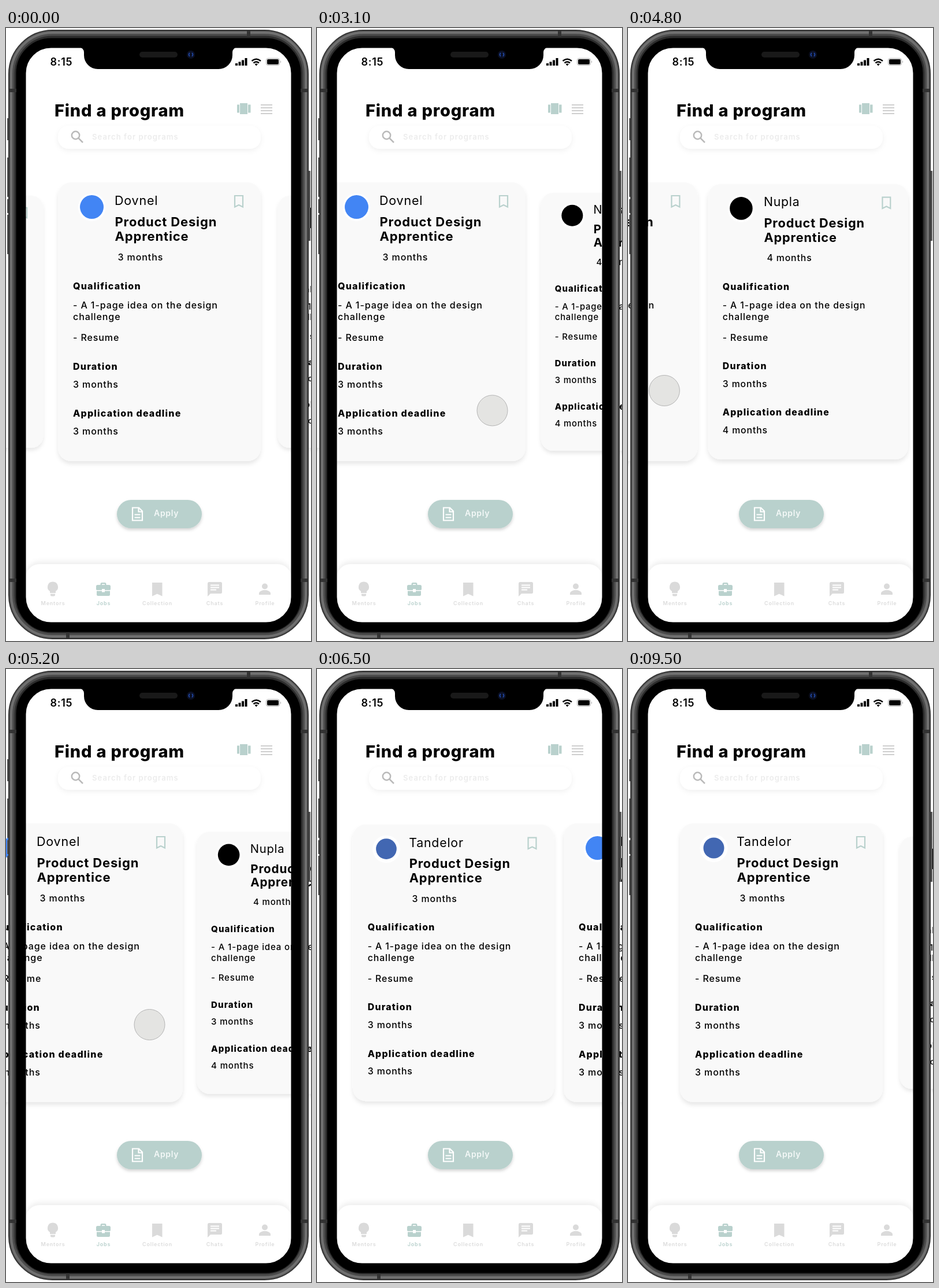
Recreate the animation shown at these times as an HTML page. Size 528x1060 px, loop 9.6 s.

```html
<!DOCTYPE html>
<html lang="en">
<head>
<meta charset="utf-8">
<title>Find a program</title>
<style>
  html, body { margin: 0; width: 100%; height: 100%; overflow: hidden; background: #fff; }
  svg { display: block; width: 528px; height: 1060px; }
  text { font-family: Inter, "Liberation Sans", sans-serif; font-optical-sizing: none; white-space: pre; }
  .body { font-size: 16px; font-weight: 500; letter-spacing: .9px; }
  .head { font-size: 16px; font-weight: 800; letter-spacing: 1.2px; }
  .role { font-size: 22px; font-weight: 700; letter-spacing: .85px; }
  .firm { font-size: 21.5px; letter-spacing: .8px; }
  .title { font-size: 29px; font-weight: 800; letter-spacing: .8px; }
  .clock { font-size: 18px; font-weight: 600; letter-spacing: .7px; }
  .hint { font-size: 13px; font-weight: 600; letter-spacing: 1.1px; fill: #ececec; }
  .apply { font-size: 14px; font-weight: 600; letter-spacing: .7px; fill: #f3f8f7; }
  .tab { font-size: 9px; font-weight: 600; letter-spacing: .8px; text-anchor: middle; }
</style>
</head>
<body>
<svg viewBox="0 0 528 1060">
  <defs>
    <filter id="soft" x="-10%" y="-10%" width="120%" height="125%">
      <feDropShadow dx="0" dy="5" stdDeviation="3.500" flood-opacity=".09"/>
    </filter>
    <filter id="faint" x="-10%" y="-20%" width="120%" height="160%">
      <feDropShadow dx="0" dy="3" stdDeviation="4" flood-opacity=".06"/>
    </filter>
    <filter id="lift" x="-10%" y="-20%" width="120%" height="160%">
      <feDropShadow dx="0" dy="3" stdDeviation="2.500" flood-opacity=".17"/>
    </filter>
    <clipPath id="screen"><rect x="34" y="34" width="460" height="994" rx="44"/></clipPath>
  </defs>

  <g id="cards"></g>

  <text class="title" x="84" y="153">Find a program</text>
  <path d="M405 130h13v19h-13zM400 132.500h4v14h-4zM419 132.500h4.500v14h-4.500z" fill="#b9d1cd"/>
  <path d="M441 133h20m-20 5h20m-20 5h20m-20 5h20" stroke="#cfcfcf" stroke-width="2"/>

  <rect x="90" y="169" width="351" height="40" rx="19" fill="#fff" filter="url(#faint)"/>
  <g fill="none" stroke="#bababa" stroke-width="2.500">
    <circle cx="120.500" cy="185.500" r="6.700"/><path d="M125.500 190.500l7.500 7.500"/>
  </g>
  <text class="hint" x="149" y="193">Search for programs</text>

  <rect x="192" y="816" width="147" height="49" rx="24.500" fill="#b9d1cd" filter="url(#lift)"/>
  <path d="M219 829.500h11l6 6v16h-17zM229.500 830v6.500h6M222.500 841.500h10m-10 5h10" fill="none" stroke="#fff" stroke-width="2.200"/>
  <text class="apply" x="256" y="844">Apply</text>

  <g clip-path="url(#screen)">
    <rect x="34" y="927" width="460" height="130" rx="24" fill="#fff" style="filter:drop-shadow(0 -4px 4px #00000012)"/>
  </g>
  <g fill="#dadada">
    <path d="M81 957.500a9 9 0 0 0-5 16.500v3h10v-3a9 9 0 0 0-5-16.500zM77 978.500h8v2q0 2-2 2h-4q-2 0-2-2z"/>
    <path d="M253 959h17.500v23.500l-8.750-4-8.750 4z"/>
    <path d="M351 958h20.500q2.500 0 2.500 2.500v15q0 2.500-2.500 2.500h-17.500l-5 5v-22.500q0-2.500 2-2.500z"/>
    <path d="M354 963.500h15m-15 4h15m-15 4h10" stroke="#fff" stroke-width="2"/>
    <circle cx="448" cy="965.500" r="5"/>
    <path d="M438 980v-2.500c0-3.500 6-5.500 10-5.500s10 2 10 5.500v2.500z"/>
  </g>
  <g fill="#b9d1cd">
    <path d="M163.500 963v-1.500q0-2.500 2.500-2.500h5q2.500 0 2.500 2.500v1.500h5q2.500 0 2.500 2.500v5q0 1.500-2 1.500h-8v-2h-5v2h-8q-2 0-2-1.500v-5q0-2.500 2.500-2.500zm2.500 0h5v-1.500h-5z"/>
    <path d="M157 973.500h9v2h5v-2h9v6q0 2.500-2.500 2.500h-18q-2.500 0-2.500-2.500z"/>
  </g>
  <g id="tabs"></g>

  <text class="clock" x="76.500" y="65">8:15</text>
  <path d="M397 61h4v4h-4zM402.500 58.500h4v6.500h-4zM408 55.500h4v9.500h-4zM413.500 52h4v13h-4z"/>
  <path d="M425.500 57q7.750-6.500 15.500 0M428.500 60.500q4.750-4 9.500 0" fill="none" stroke="#000" stroke-width="2.500"/>
  <path d="M433.250 65.500l-2.600-3q2.600-2 5.200 0z"/>
  <rect x="450.500" y="52.500" width="23" height="12" rx="3.500" fill="none" stroke="#aaa"/>
  <rect x="452" y="54" width="20" height="9" rx="2"/>
  <path d="M475 56.500q2 2 0 4z" fill="#aaa"/>

  <g fill="none">
    <path d="M3.500 156v38M3.500 224v68M3.500 296v24M3.500 323v68M525.500 247v121" stroke="#555" stroke-width="3"/>
    <rect x="11.500" y="10.500" width="505" height="1039" rx="69" stroke="#2c2c2c" stroke-width="15"/>
    <rect x="10" y="9" width="508" height="1042" rx="70" stroke="#4c4c4c" stroke-width="9"/>
    <rect x="9" y="8" width="510" height="1044" rx="71" stroke="#707070" stroke-width="4"/>
    <rect x="26" y="26" width="476" height="1010" rx="52" stroke="#000" stroke-width="17"/>
    <path d="M4 108h14M510 108h14M4 955h14M510 955h14M420 3v12M107 1045v12" stroke="#333" stroke-width="6"/>
  </g>
  <path d="M126 33a9 9 0 0 1 9 9v5a24 24 0 0 0 24 24h209a24 24 0 0 0 24-24v-5a9 9 0 0 1 9-9z"/>
  <rect x="231" y="41" width="66" height="10" rx="5" fill="#191919"/>
  <circle cx="320" cy="46" r="7" fill="#0b1024"/>
  <path d="M318 43q-3 3 0 6M322 43q3 3 0 6" fill="none" stroke="#2450b8" stroke-width="1.500"/>

  <circle id="cursor" r="26.500"/>
</svg>
<script>
const LOOP = 9600, TRAVEL = 367, SMALL = .905, CX = 265.5, CY = 508;
const $ = id => document.getElementById(id);
const label = (cls, x, y, s) => `<text class="${cls}" x="${x}" y="${y}">${s}</text>`;

const card = (id, firm, color, radius, months) => `<g id="${id}">
  <rect x="90" y="267" width="351" height="482" rx="23" fill="#f9f9f9" filter="url(#soft)"/>
  <circle cx="148.500" cy="310" r="24" fill="#fff"/>
  <circle cx="148.500" cy="309.500" r="${radius}" fill="${color}"/>
  <path d="M396 290h14v19.500l-7-3.500-7 3.500z" fill="none" stroke="#b9d1cd" stroke-width="2.200"/>` +
  label("firm", 188, 306, firm) +
  label("role", 188.5, 343, "Product Design") +
  label("role", 188.5, 368, "Apprentice") +
  label("body", 193.5, 402, months) +
  label("head", 116, 452, "Qualification") +
  label("body", 116, 485, "- A 1-page idea on the design") +
  label("body", 116, 505, "challenge") +
  label("body", 116, 541, "- Resume") +
  label("head", 116, 591, "Duration") +
  label("body", 116, 622, "3 months") +
  label("head", 116, 672, "Application deadline") +
  label("body", 116, 703, months) + "</g>";

$("cards").innerHTML =
  card("left", "Tandelor", "#4267b2", 18, "3 months") +
  card("right", "Nupla", "#000", 20, "4 months") +
  card("middle", "Dovnel", "#4285f4", 20.5, "3 months");

$("tabs").innerHTML = [["Mentors", 81.5], ["Jobs", 169], ["Collection", 262], ["Chats", 361.5], ["Profile", 448.5]]
  .map(([s, x]) => `<text class="tab" x="${x}" y="998" fill="${s === "Jobs" ? "#b9d1cd" : "#dcdcdc"}">${s}</text>`).join("");

// Keys are [time, value, ...]; between them values run linearly.
const drag = [[2900, 0], [3600, -280], [4000, -TRAVEL], [4700, -TRAVEL], [5200, -135], [6000, 33], [6200, 130], [6500, 337], [6700, TRAVEL]];
const hover = [[100, 560, 130], [1000, 510, 225], [1500, 467, 350], [1700, 447, 475], [2300, 447, 475], [2800, 384, 666]];
const height = [[2900, 666], [3600, 650], [4000, 636], [4700, 630], [5200, 615], [6000, 628], [6200, 632]];

function at(keys, t, i = 1) {
  const n = keys.findIndex(k => k[0] > t);
  if (n === 0) return keys[0][i];
  if (n < 0) return keys[keys.length - 1][i];
  const a = keys[n - 1], b = keys[n];
  return a[i] + (b[i] - a[i]) * (t - a[0]) / (b[0] - a[0]);
}

// A side card grows to full size as it reaches the centre.
function placeSide(id, home, p) {
  const s = SMALL + (1 - SMALL) * p, x = CX + home * (1 - p);
  $(id).setAttribute("transform", `translate(${x} ${CY}) scale(${s}) translate(${-CX} ${-CY})`);
}

function draw(now) {
  const t = Math.floor(now % LOOP / 100) * 100;
  const shift = at(drag, t), pressed = t >= 2900;
  placeSide("left", -360, Math.max(0, shift) / TRAVEL);
  placeSide("right", 364, Math.max(0, -shift) / TRAVEL);
  $("middle").setAttribute("transform", `translate(${shift} 0)`);
  $("middle").setAttribute("visibility", t < 6800 ? "visible" : "hidden");

  const c = $("cursor");
  c.setAttribute("cx", pressed ? 383.5 + shift : at(hover, t));
  c.setAttribute("cy", pressed ? at(height, t) : at(hover, t, 2));
  c.setAttribute("fill", pressed ? "#e4e4e2" : "#e4e4e288");
  c.setAttribute("stroke", pressed ? "#b4b4b4" : "#cfcfcf");
  c.setAttribute("visibility", t >= 100 && t <= 6200 ? "visible" : "hidden");
}

const start = performance.now();
function tick() {
  draw(performance.now() - start);
  requestAnimationFrame(tick);
}
tick();
</script>
</body>
</html>
```
